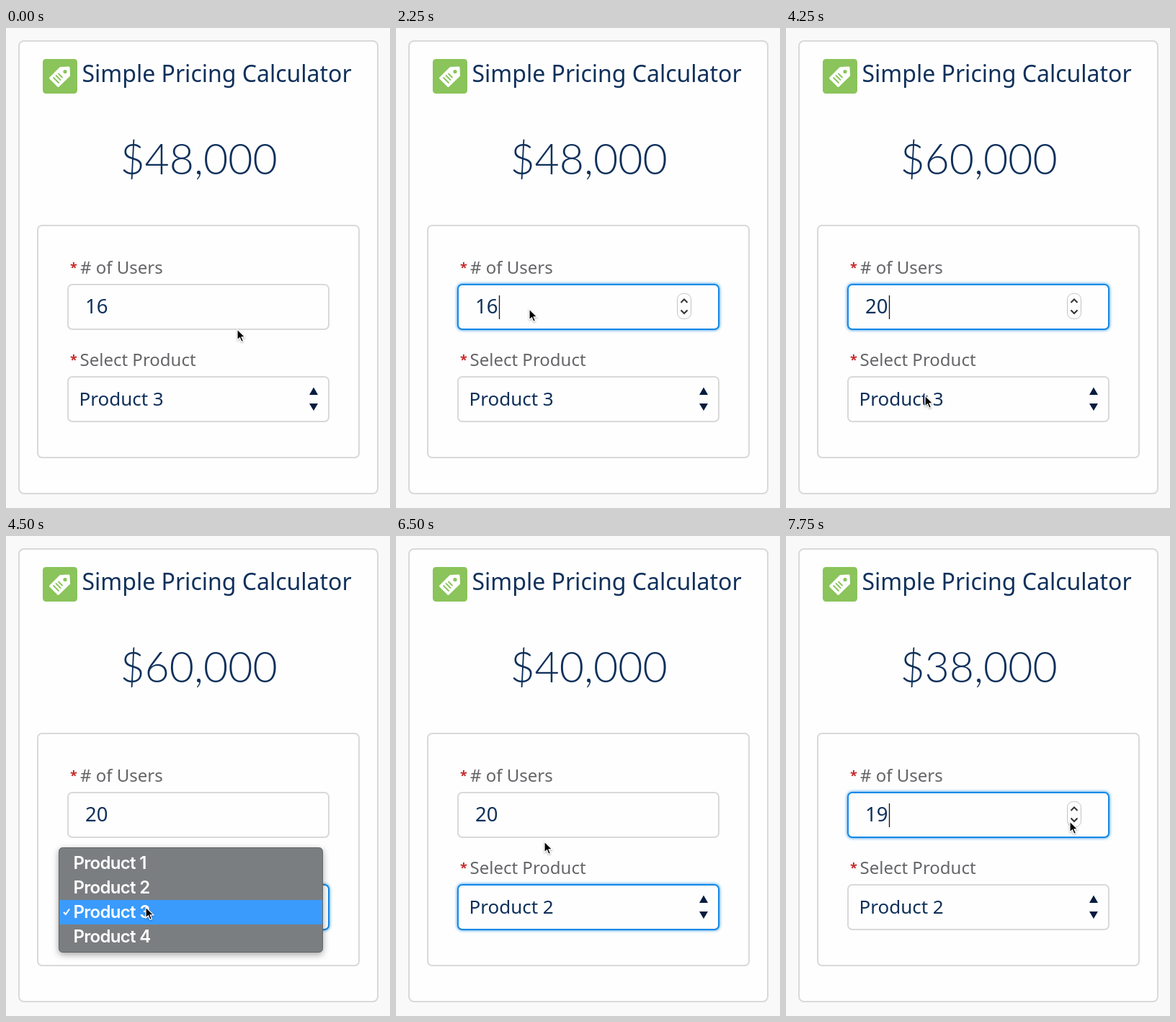
These frames come from a looping animation (533 by 666 pixels, 8 s). An HTML page:

```html
<!DOCTYPE html>
<html lang="en">
<head>
<meta charset="utf-8">
<title>Simple Pricing Calculator</title>
<style>
  html, body { margin: 0; width: 100%; height: 100%; overflow: hidden; background: #f8f9f8; }
  svg { display: block; width: 533px; height: 666px; }
  text { font-family: "Noto Sans", "Open Sans", sans-serif; fill: #0f305b; white-space: pre; }
  .box { fill: #fefefe; stroke: #d9d9da; stroke-width: 2; }
  .focus { stroke: #1589e6; filter: drop-shadow(0 0 2px #1589e6); }
  .label { font-size: 24px; fill: #646568; }
  .star { font-size: 18px; font-weight: 700; fill: #c62828; }
  #price { font: 300 59px Lato, "Open Sans", sans-serif; }
  #menu rect:first-child { filter: drop-shadow(0 3px 5px rgba(0, 0, 0, .35)); }
  #menu text { font: 600 24px Inter, Roboto, sans-serif; letter-spacing: -.7px; fill: #fff; }
  #cursor { filter: drop-shadow(0 1px 1px rgba(0, 0, 0, .3)); }
</style>
</head>
<body>
<svg viewBox="0 0 533 666">
  <rect class="box" x="18" y="18" width="498" height="628" rx="7"/>
  <rect x="51" y="43" width="48" height="48" rx="4.500" fill="#8ac45b"/>
  <g stroke-linecap="round" stroke-linejoin="round">
    <path d="M61.500 69.500L75.500 55.500L87 55L87.500 66L72.500 80.500Z" fill="#fff" stroke="#fff" stroke-width="3"/>
    <path d="M66 69L73 76M69.500 66L75.500 72M73 63.500L78 68.500" stroke="#8ac45b" stroke-width="1.800"/>
    <circle cx="82" cy="60.500" r="2.600" fill="#8ac45b"/>
  </g>
  <text x="105.500" y="75" font-size="32">Simple Pricing Calculator</text>
  <text id="price" x="267.500" y="203" text-anchor="middle"></text>

  <rect class="box" x="44" y="274" width="446" height="322" rx="6"/>
  <text class="star" x="89" y="339">*</text>
  <text class="label" x="103" y="341"># of Users</text>
  <rect id="usersBox" class="box" x="86" y="356" width="362" height="62" rx="6"/>
  <text id="users" x="110" y="396" font-size="27.500"></text>
  <path id="caret" d="M0 371V404" stroke="#111" stroke-width="1.300"/>
  <g id="spinner" fill="none">
    <rect x="390.500" y="368.500" width="19" height="35" rx="8" fill="#fdfdfd" stroke="#c4c4c4"/>
    <path d="M395.500 381L400 376.500L404.500 381M395.500 391.500L400 396L404.500 391.500" stroke="#333" stroke-width="2"/>
  </g>

  <text class="star" x="89" y="467">*</text>
  <text class="label" x="102.500" y="469">Select Product</text>
  <rect id="productBox" class="box" x="86" y="484" width="362" height="62" rx="6"/>
  <text id="product" x="101.500" y="524" font-size="26"></text>
  <path d="M421 509L427 498.500L433 509ZM421 521L427 531L433 521Z" fill="#061c3f"/>

  <g id="menu">
    <rect x="73.500" y="432.500" width="366" height="145" rx="5" fill="#7b7e80" stroke="#616466"/>
    <rect id="hover" x="74" width="365" height="34" fill="#3a9bfc"/>
    <path d="M80 522L82.800 525L88 517.500" fill="none" stroke="#fff" stroke-width="2"/>
  </g>
  <path id="cursor" d="M0 0V15L3.500 11.800L5.900 17.400L8.500 16.300L6.100 10.800H10.800Z" stroke="#fff" stroke-width="1.200"/>
</svg>
<script>
const $ = id => document.getElementById(id);
const LOOP = 8000;
const ROW = 34;
const rates = { 2: 2000, 3: 3000 };
const start = { users: '16', product: 3, focus: '', caret: 0, spinner: 0, menu: 0, hover: 3 };

// [time, cursor x, cursor y, changes]
const steps = [
  [0, 321, 418],
  [250, 275, 394],
  [750, 230, 406],
  [1000, 195, 397, { focus: 'users', spinner: 1, caret: 1 }],
  [1250, 184, 390],
  [1750, 185, 390, { caret: 0 }],
  [2250, 185, 390, { caret: 1 }],
  [2500, 185, 390, { users: '1' }],
  [2750, 185, 390, { users: '' }],
  [3000, 185, 390, { users: '2' }],
  [3250, 185, 390, { users: '20' }],
  [3750, 186, 427, { caret: 0 }],
  [4000, 191, 487],
  [4250, 193, 510, { caret: 1 }],
  [4500, 194, 515, { focus: 'product', spinner: 0, caret: 0, menu: 1 }],
  [4750, 192, 508],
  [5000, 187, 491, { hover: 2 }],
  [5250, 187, 491, { menu: .85 }],
  [5500, 187, 491, { menu: 0, product: 2 }],
  [6250, 192, 467],
  [6500, 206, 424],
  [6750, 310, 407],
  [7000, 393, 396, { spinner: 1 }],
  [7250, 394, 396, { focus: 'users', caret: 1 }],
  [7500, 394, 396, { users: '19' }]
];

for (let i = 1; i <= 4; i++) {
  $('menu').insertAdjacentHTML('beforeend',
    `<text x="93.500" y="${427.5 + ROW * i}">Product ${i}</text>`);
}

function stateAt(time) {
  const state = { ...start };
  for (const [at, x, y, changes] of steps) {
    if (at > time) break;
    Object.assign(state, { x, y }, changes);
  }
  return state;
}

function draw(time) {
  const s = stateAt(time);
  const total = Number(s.users) * rates[s.product];
  $('price').textContent = '$' + total.toLocaleString('en-US');
  $('users').textContent = s.users;
  $('product').textContent = 'Product ' + s.product;
  for (const field of ['users', 'product']) {
    $(field + 'Box').classList.toggle('focus', s.focus === field);
  }
  for (const part of ['caret', 'spinner', 'menu']) $(part).style.opacity = s[part];
  $('caret').setAttribute('transform', `translate(${111.5 + 16 * s.users.length})`);
  $('hover').setAttribute('y', 403 + ROW * s.hover);
  $('cursor').setAttribute('transform', `translate(${s.x} ${s.y})`);
}

function tick(now) {
  draw(now % LOOP);
  requestAnimationFrame(tick);
}
draw(0);
requestAnimationFrame(tick);
</script>
</body>
</html>
```
